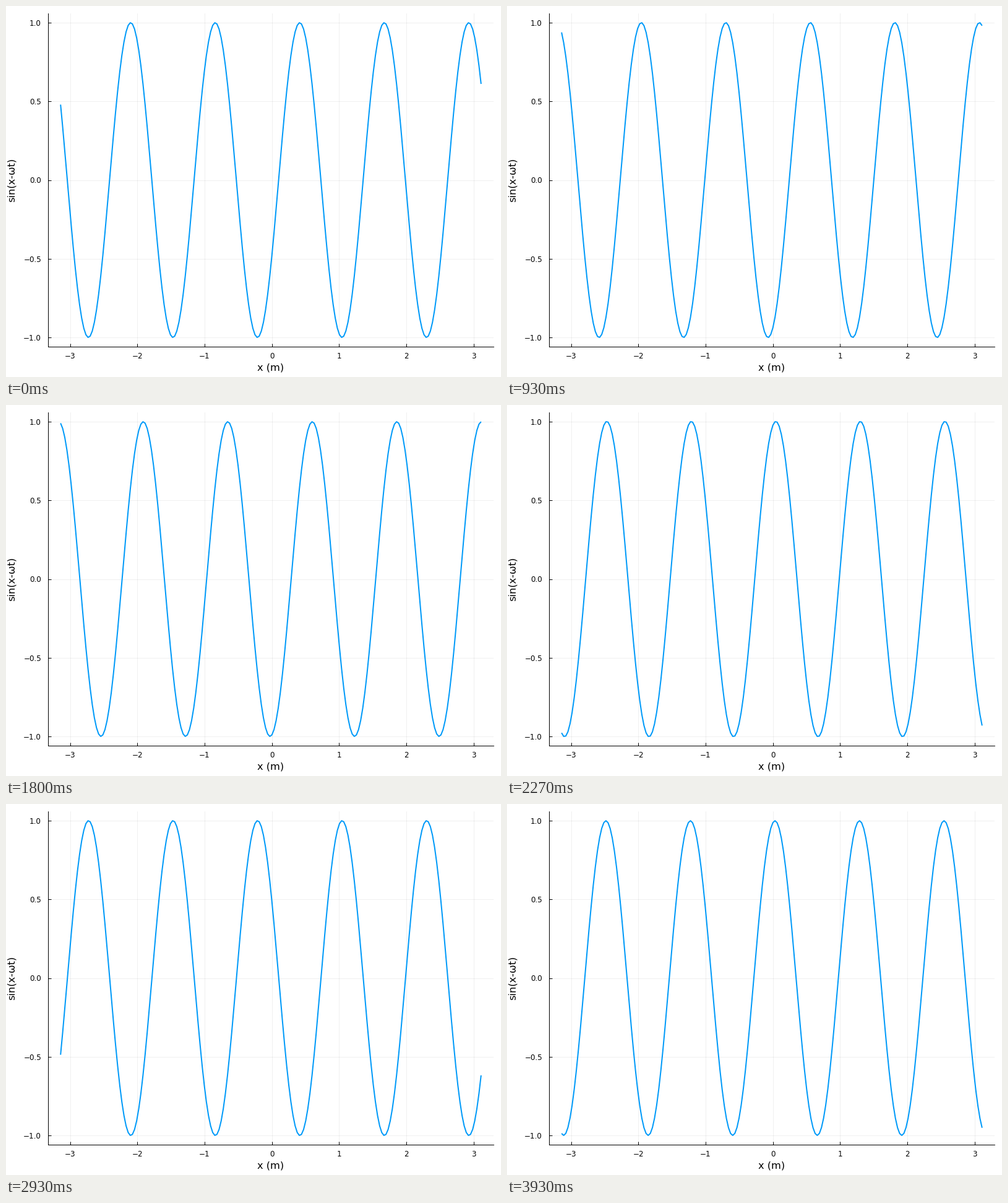
These frames come from a looping animation (800x600 px, 3.99 s). A matplotlib script:

```python
import numpy as np
import matplotlib.pyplot as plt
from matplotlib.animation import FuncAnimation

W, H, DPI = 800, 600, 100
LEFT, RIGHT, TOP, BOTTOM = 67.8, 788.2, 11.8, 551.2   # plot area in pixels
TICK_MS, TICKS = 30, 133
STEPS_PER_TICK = 0.45                                 # 15 wave steps per second
WAVE_NUMBER, OMEGA = 5, 0.5


def pt(px):
    return px * 72 / DPI


def padded(values, margin=0.03):
    lo, hi = values.min(), values.max()
    pad = margin * (hi - lo)
    return lo - pad, hi + pad


def minus(text):
    return text.replace("-", "\u2212")


plt.rcParams["font.family"] = "DejaVu Sans"
fig = plt.figure(figsize=(W / DPI, H / DPI), dpi=DPI, facecolor="white")
ax = fig.add_axes([LEFT / W, 1 - BOTTOM / H,
                   (RIGHT - LEFT) / W, (BOTTOM - TOP) / H])

x = np.arange(-100, 100) * np.pi / 100
ax.set_xlim(*padded(x))
xticks = np.arange(-3, 4)
yticks = np.arange(-2, 3) / 2
ax.set_xticks(xticks, [minus(f"{v}") for v in xticks])
ax.set_yticks(yticks, [minus(f"{v:.1f}") for v in yticks])

ax.set_axisbelow(True)
ax.grid(color="black", alpha=0.06, linewidth=pt(1))
ax.spines[["top", "right"]].set_visible(False)
ax.spines[["left", "bottom"]].set_linewidth(pt(1))
ax.tick_params(direction="in", length=pt(5), width=pt(1), labelsize=pt(11.9))
ax.tick_params(axis="x", pad=pt(8.4))
ax.tick_params(axis="y", pad=pt(10.8))

label = dict(fontsize=pt(16.3), ha="center", va="baseline",
             rotation_mode="anchor")
fig.text((LEFT + RIGHT) / 2 / W, 1 - 590 / H, "x (m)", **label)
fig.text(14 / W, 1 - (TOP + BOTTOM) / 2 / H, "sin(x-ωt)", rotation=90, **label)

wave, = ax.plot([], [], color="#009AF9", linewidth=pt(2),
                solid_capstyle="butt")


def update(tick):
    t = 1 + int(STEPS_PER_TICK * tick + 0.35)
    y = np.sin(WAVE_NUMBER * x - OMEGA * t)
    wave.set_data(x, y)
    ax.set_ylim(*padded(y))
    return wave,


anim = FuncAnimation(fig, update, frames=TICKS, interval=TICK_MS,
                     repeat=True, repeat_delay=0, blit=False)
plt.show()
```
